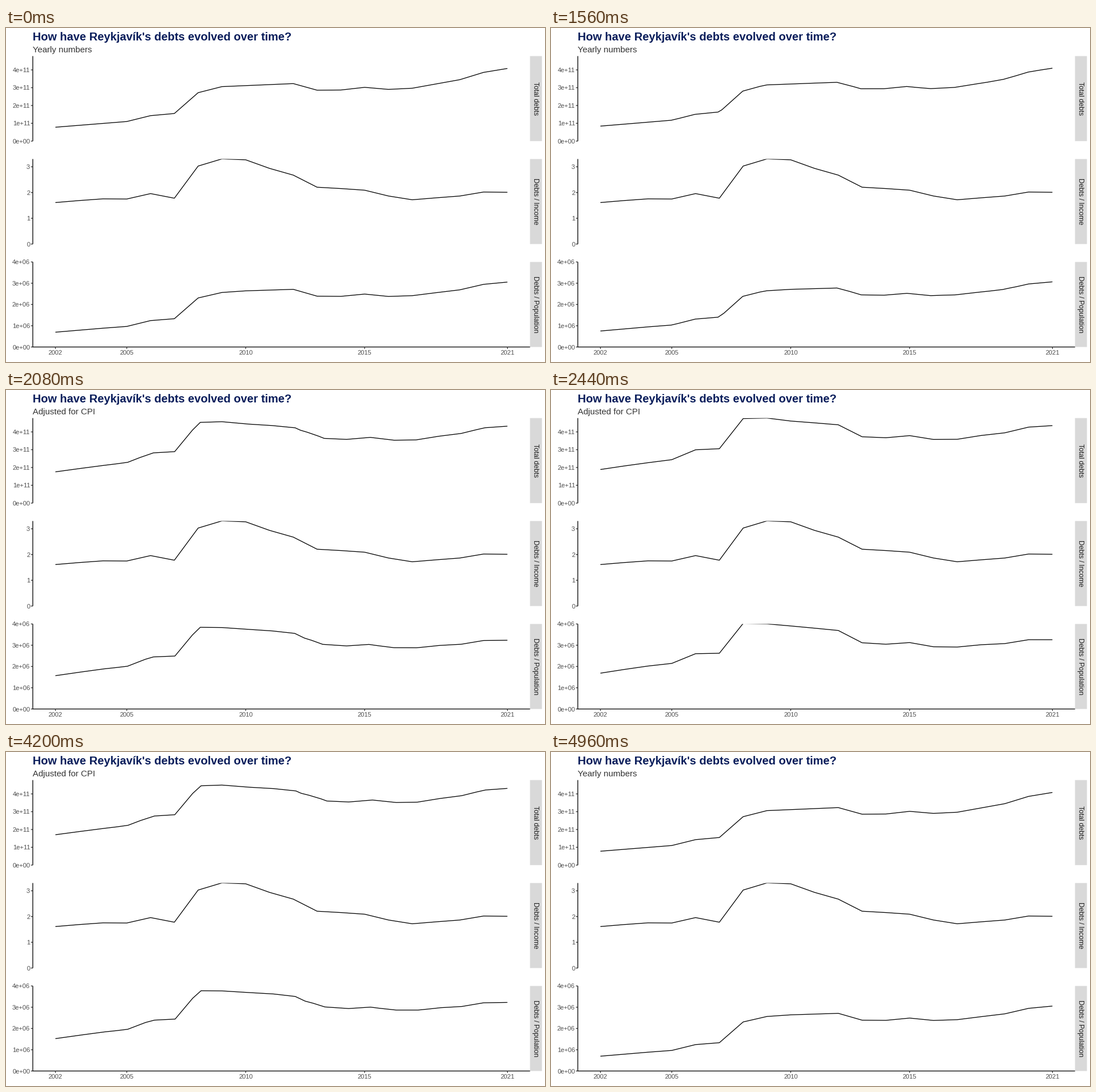
A matplotlib script for the animation above (5 s loop, 950 by 590 pixels).

```python
import matplotlib.pyplot as plt
import numpy as np
from matplotlib.animation import FuncAnimation
from matplotlib.patches import Rectangle

W, H, DPI = 950, 590, 100
FRAMES, INTERVAL = 125, 40
MOVE = 29                      # frames in one transition
TO_CPI, TO_YEARLY = 32, 95     # last still frame before each transition
VERTICES = 50                  # points per line while morphing
PX = 72 / DPI                  # points per pixel

LEFT, RIGHT = 47.3, 923.6
PANEL_TOP, PANEL_HEIGHT, PANEL_PITCH = 49.6, 150.2, 181.85
YEAR0_X, YEAR_STEP = 87.1, 41.926
TICK_GREY, LABEL_GREY, STRIP_GREY = "#333333", "#4d4d4d", "#d9d9d9"
YEARS = np.arange(2002, 2022)

plt.rcParams["font.family"] = "Liberation Sans"
fig = plt.figure(figsize=(W / DPI, H / DPI), dpi=DPI, facecolor="white")
ax = fig.add_axes([0, 0, 1, 1])
ax.set_xlim(0, W)
ax.set_ylim(H, 0)
ax.axis("off")


def yearly(key_points):
    """Straight lines between a few (year: value) points."""
    return np.interp(YEARS, list(key_points), list(key_points.values()))


# Debts and income in 1e11, population in 1e5, price level relative to today.
debts = yearly({2002: 0.78, 2005: 1.10, 2006: 1.43, 2007: 1.55, 2008: 2.72,
                2009: 3.06, 2012: 3.23, 2013: 2.86, 2014: 2.87, 2015: 3.02,
                2016: 2.905, 2017: 2.97, 2019: 3.45, 2020: 3.86, 2021: 4.08})
income = yearly({2002: 0.484, 2004: 0.566, 2005: 0.629, 2006: 0.73, 2007: 0.871,
                 2010: 0.953, 2012: 1.207, 2013: 1.296, 2014: 1.332,
                 2016: 1.557, 2017: 1.728, 2020: 1.911, 2021: 2.03})
prices = yearly({2002: 2.42, 2005: 2.217, 2007: 1.971, 2008: 1.745, 2009: 1.561,
                 2010: 1.479, 2013: 1.303, 2018: 1.183, 2021: 1.067})
population = yearly({2002: 1.12, 2004: 1.123, 2009: 1.193, 2010: 1.18,
                     2013: 1.196, 2017: 1.23, 2021: 1.336})


def text(x, y, s, px, color, **kw):
    return ax.text(x, y, s, fontsize=px * PX, color=color, va="baseline", **kw)


def stroke(xs, ys, color="black"):
    return ax.plot(xs, ys, color=color, lw=1.3 * PX, solid_capstyle="butt",
                   solid_joinstyle="round", snap=False)[0]


def year_x(year):
    return YEAR0_X + YEAR_STEP * (year - YEARS[0])


def resample(values):
    """Share out extra vertices along the edges by their vertical travel."""
    travel = np.cumsum(np.abs(np.diff(values)))
    extra = np.ceil((VERTICES - len(values)) * travel / travel[-1] - 1e-9)
    parts = np.diff(extra, prepend=0).astype(int) + 1
    year = YEARS[0] + np.append(0, np.cumsum(np.repeat(1 / parts, parts)))
    return year, np.interp(year, YEARS, values)


def sci(power):
    return [f"{i}e+{power if i else 0:02d}" for i in range(5)]


def add_panel(row, unit, ticks, strip, values, adjusted):
    """Draw one facet; return its line with the two pixel paths it morphs between."""
    top = PANEL_TOP + row * PANEL_PITCH
    base = top + PANEL_HEIGHT
    stroke([LEFT, LEFT], [top, base])
    for i, label in enumerate(ticks):
        y = base - i * unit
        stroke([LEFT - 3.4, LEFT], [y, y], TICK_GREY)
        text(42.3, y + 4, label, 11.1, LABEL_GREY, ha="right")
    ax.add_patch(Rectangle((RIGHT, top), 21, PANEL_HEIGHT, fc=STRIP_GREY, lw=0,
                           snap=False))
    text(929.8, (top + base) / 2, strip, 12.3, "#1a1a1a", ha="center",
         rotation=-90, rotation_mode="anchor")

    line = stroke([], [])
    window = Rectangle((LEFT, top), RIGHT - LEFT, PANEL_HEIGHT,
                       transform=ax.transData)
    # Clipping by path keeps the cut edge antialiased.
    line.set_clip_path(window.get_path(), window.get_transform())
    paths = []
    for series in (values, adjusted):
        year, value = resample(series)
        paths.append(np.array([year_x(year), base - unit * value]))
    return line, *paths


ratio, per_head = debts / income, debts / population
panels = [
    add_panel(0, 31.45, sci(11), "Total debts", debts, debts * prices),
    add_panel(1, 45.5, range(4), "Debts / Income", ratio, ratio),
    add_panel(2, 37.55, sci(6), "Debts / Population", per_head, per_head * prices),
]

floor = PANEL_TOP + 2 * PANEL_PITCH + PANEL_HEIGHT
stroke([LEFT - 0.6, RIGHT], [floor, floor])
for year in (2002, 2005, 2010, 2015, 2021):
    x = year_x(year)
    stroke([x, x], [floor, floor + 3.4], TICK_GREY)
    text(x, 576.8, str(year), 11.1, LABEL_GREY, ha="center")

text(47, 22.3, "How have Reykjavík's debts evolved over time?", 20.1, "#081c5a",
     weight="bold")
subtitle = text(47, 42.6, "", 15.15, TICK_GREY)


def ease(t):
    """Cubic in-out."""
    t = min(max(t, 0), 1)
    return 4 * t ** 3 if t < 0.5 else 1 - 4 * (1 - t) ** 3


def update(frame):
    mix = ease((frame - TO_CPI) / MOVE) - ease((frame - TO_YEARLY) / MOVE)
    for line, plain, adjusted in panels:
        line.set_data(*(plain + (adjusted - plain) * mix))
    subtitle.set_text("Adjusted for CPI" if mix > 0.5 else "Yearly numbers")
    return [panel[0] for panel in panels] + [subtitle]


anim = FuncAnimation(fig, update, frames=FRAMES, interval=INTERVAL, repeat=True,
                     repeat_delay=0)
plt.show()
```
